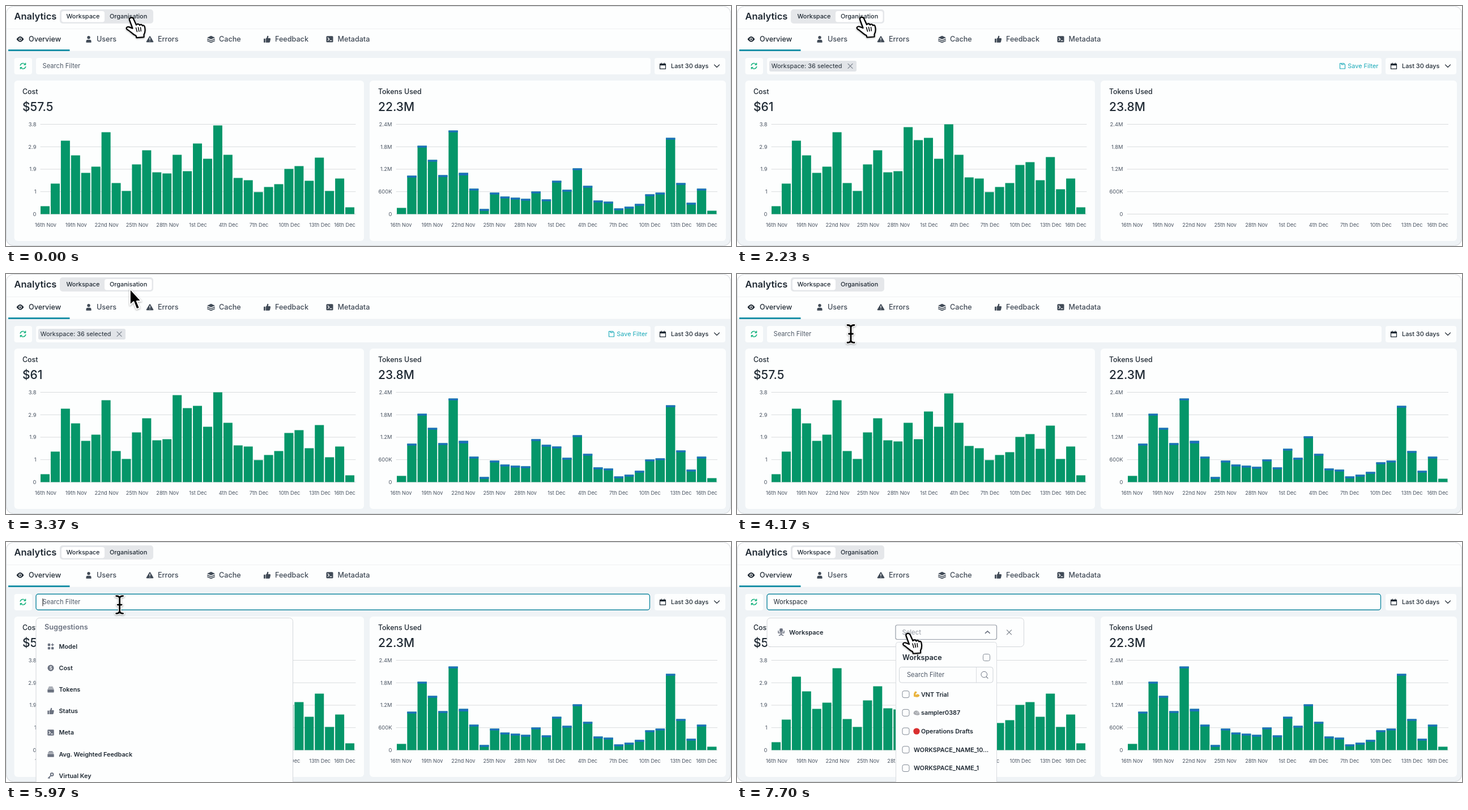
An HTML page for the animation above (7730 ms loop, 1280 by 425 pixels).

```html
<!DOCTYPE html>
<html lang="en">
<head>
<meta charset="utf-8">
<title>Analytics</title>
<style>
  html, body { margin: 0; width: 100%; height: 100%; overflow: hidden; background: #fff; }
  svg { display: block; width: 100vw; height: 100vh; font-family: Inter, "Open Sans", sans-serif; }
  #cursor { filter: drop-shadow(0 1px 1.5px rgba(0, 0, 0, .35)); }
</style>
</head>
<body>
<svg id="stage" viewBox="0 0 1280 425" xmlns="http://www.w3.org/2000/svg"></svg>
<script>
const LOOP = 7730;
const INK = '#1f2933', ICON = '#414b57', GREY = '#6b7280', TEAL = '#1488a0';
const PANEL = '#fdfefe', GREEN = '#059669', BLUE = '#1d6fbd';
const BASE = 368.5, COUNT = 31;

// Key moments in ms
const T = {
  click: 960, costReady: 1740, tokensReady: 2150, costGrow: 1760, tokensGrow: 2240,
  leave: 3250, reset: 3650, focus: 4570, descend: 5870, pick: 6480, across: 6800, open: 7350
};

// Small markup helpers
const text = (x, y, s, size, weight = 400, fill = INK, anchor = 'start', id = '') =>
  `<text ${id && `id="${id}"`} x="${x}" y="${y}" font-size="${size}" font-weight="${weight}" fill="${fill}" text-anchor="${anchor}">${s}</text>`;
const box = (x, y, w, h, r, fill, stroke = 'none', extra = '') =>
  `<rect x="${x}" y="${y}" width="${w}" height="${h}" rx="${r}" fill="${fill}" stroke="${stroke}" ${extra}/>`;
const line = (d, stroke, width = 1, extra = '') =>
  `<path d="${d}" fill="none" stroke="${stroke}" stroke-width="${width}" stroke-linecap="round" stroke-linejoin="round" ${extra}/>`;
const shape = (d, fill) => `<path d="${d}" fill="${fill}"/>`;
const at = (x, y, body, k = 1) => `<g transform="translate(${x} ${y}) scale(${k})">${body}</g>`;
const group = (id, body) => `<g id="${id}">${body}</g>`;
const cross = (x, y, r = 4) => at(x, y, line(`M${-r} ${-r}L${r} ${r}M${r} ${-r}L${-r} ${r}`, '#7b828c', 1.2));

const icons = {
  eye: c => shape('M-6.5 0Q0 -9.5 6.5 0Q0 9.5 -6.5 0Z', c) + `<circle r="2.7" fill="#fff"/><circle r="1.5" fill="${c}"/>`,
  user: c => `<circle cy="-3" r="2.7" fill="${c}"/>` + shape('M-4.5 6V3.5Q-4.5 1 -2 1H2Q4.5 1 4.5 3.5V6Z', c),
  warn: c => line('M0 -4.5L5.3 4.5H-5.3Z', c, 2, `style="fill:${c}"`) + line('M0 -2V1M0 3.4V3.5', '#fff', 1.3),
  stack: c => shape('M0 -6L7 -2.8L0 .4L-7 -2.8Z', c) + line('M-6.3 0L0 2.9L6.3 0M-6.3 2.9L0 5.8L6.3 2.9', c, 1.5),
  thumb: c => box(-6, -1, 2.8, 7, .6, c) +
    shape('M-2.4 6V-.6L-.2 -3.2V-5.2Q1.8 -7 2.4 -4.6L1.7 -1.6H5Q6.3 -1.4 6 .2L5 4.8Q4.6 6 3.4 6Z', c),
  term: c => box(-6, -5.5, 12, 11, 1.5, c) + line('M-3.2 -2.4L-.8 0L-3.2 2.4M.6 2.6H3.4', '#fff', 1.3),
  grid: c => box(-5.5, -5.5, 4.6, 4.6, 1, c) + box(-5.5, 1, 4.6, 4.6, 1, c) + box(1, 1, 4.6, 4.6, 1, c) +
    line('M3.3 -5.3V-1.1M1.2 -3.2H5.4', c, 1.5),
  coin: c => `<circle r="5.8" fill="${c}"/>` + text(0, 3.1, '$', 8.5, 600, '#fff', 'middle'),
  drawer: c => box(-6, -.5, 12, 6, 1, c) + line('M-4.7 -2.3H4.7M-3.2 -4.6H3.2', c, 1.4),
  key: c => `<circle cx="2.2" cy="-2.2" r="2.5" fill="none" stroke="${c}" stroke-width="2"/>` + line('M.2 -.2L-4.5 4.5M-3.2 3.2L-2 4.5', c, 1.8),
  chair: c => box(-2.8, -6.5, 5.6, 6.4, 1.5, c) + line('M-5 -2V1.6H5V-2M0 2V5M-3.5 6L0 4.2L3.5 6', c, 1.5)
};
const icon = (name, x, y, c = ICON, k = 1) => at(x, y, icons[name](c), k);

// Bar tops in stage pixels; `org` holds only what differs
const charts = [
  {
    key: 'cost', left: 61, right: 617, pitch: 17.935, bar: 16, labelX: 70, labelStep: 53.8, lastX: 598,
    ticks: ['3.8', '2.9', '1.9', '1', '0'], title: 'Cost', totals: ['$57.5', '$61'],
    tops: [355, 315, 239, 265, 296, 285, 224, 314, 328, 281, 256, 295, 297, 264, 293, 244, 271, 212, 264, 305, 309,
      330, 321, 316, 289, 284, 310, 269, 328, 306, 357],
    org: { 12: 293, 13: 215, 14: 238, 15: 234, 17: 210, 19: 304, 20: 306, 23: 314, 24: 282, 25: 277, 26: 309, 27: 268, 28: 325 }
  },
  {
    key: 'tokens', left: 689, right: 1255.5, pitch: 18.27, bar: 16.4, labelX: 697.5, labelStep: 54.9, lastX: 1237,
    ticks: ['2.4M', '1.8M', '1.2M', '600K', '0'], title: 'Tokens Used', totals: ['22.3M', '23.8M'],
    tops: [358, 301, 248, 273, 300, 221, 296, 324, 360, 331, 338, 340, 342, 329, 343, 310, 326, 288, 319, 345, 347,
      359, 356, 351, 334, 331, 234, 314, 349, 324, 363],
    org: { 12: 341, 13: 293, 14: 303, 15: 306, 17: 286, 19: 343, 20: 345, 23: 349, 24: 329, 25: 327, 26: 233, 27: 313, 28: 347, 30: 362 }
  }
];
const days = ['16th Nov', '19th Nov', '22nd Nov', '25th Nov', '28th Nov', '1st Dec', '4th Dec', '7th Dec', '10th Dec', '13th Dec', '16th Dec'];
const capHeight = i => i === 0 || i === 30 ? 0 : i === 6 ? 4.5 : 3.2;

function chartMarkup(c) {
  let s = '';
  c.ticks.forEach((label, i) => {
    const y = 209.5 + i * 39.75;
    s += line(`M${c.left} ${y}H${c.right}`, '#d9dbdd', 1.2) + text(c.left - 7.5, y + 3.4, label, 9.4, 400, '#4b5563', 'end');
  });
  days.forEach((d, i) => {
    s += text(i === 10 ? c.lastX : c.labelX + i * c.labelStep, 391.3, d, 9.2, 400, '#4b5563', 'middle');
  });
  for (let i = 0; i < COUNT; i++) {
    const x = c.left + (c.key === 'tokens' ? 1 : 0) + i * c.pitch;
    s += `<rect class="${c.key}Bar" x="${x}" width="${c.bar}" fill="${GREEN}"/>`;
    if (c.key === 'tokens') s += `<rect class="tokensCap" x="${x}" width="${c.bar}" fill="${BLUE}"/>`;
  }
  return group(c.key + 'Chart', text(c.left - 32, 186.3, '', 21, 500, INK, 'start', c.key + 'Total') + s);
}

function spinner(id, x) {
  const p = a => `${17.5 * Math.cos(a * Math.PI / 180)} ${17.5 * Math.sin(a * Math.PI / 180)}`;
  return at(x, 286, group(id, line(`M${p(172)}A17.5 17.5 0 1 1 ${p(80)}`, '#1f8fae', 2)));
}

const tabs = [
  ['eye', 25, 40, 'Overview'], ['user', 146, 160, 'Users'], ['warn', 254, 268, 'Errors'],
  ['stack', 362, 376, 'Cache'], ['thumb', 461, 475, 'Feedback'], ['term', 571.5, 585.5, 'Metadata']
];
const suggestions = [
  ['grid', 'Model'], ['coin', 'Cost'], ['drawer', 'Tokens'], ['thumb', 'Status'],
  ['term', 'Meta'], ['drawer', 'Avg. Weighted Feedback'], ['key', 'Virtual Key']
];

const header =
  box(0, 0, 1280, 425, 13, '#eff3f6') +
  shape('M0 79.5V13Q0 0 13 0H1267Q1280 0 1280 13V79.5Z', '#fdfefe') +
  line('M1 40.5H1279', '#f0f1f3') +
  text(14.5, 24.3, 'Analytics', 16.5, 600) +
  box(95, 6, 165, 25, 5, '#e5e7ea') + box(98, 9, 76, 19.5, 4, '#fff', 'none', 'id="pill"') +
  text(106.5, 22.3, 'Workspace', 10.9, 500) + text(183, 22.3, 'Organisation', 10.9, 500) +
  tabs.map(([n, ix, tx, s], i) => icon(n, ix, 58.7, i ? ICON : INK) + text(tx, 63.2, s, 12.6, 500, i ? '#404a56' : INK)).join('') +
  box(4, 77, 108.5, 2.8, 0, '#0f8ba3');

const toolbar =
  box(14.5, 92, 31.5, 29, 4, PANEL) + box(53, 92, 1085, 29, 4, PANEL) + box(1145, 92, 125, 29, 4, PANEL) +
  at(30, 106.3, line('M-4.8 -1.2A5 5 0 0 1 4.2 -2.6M4.8 1.2A5 5 0 0 1 -4.2 2.6M4.6 -5V-2.3H1.8M-4.6 5V2.3H-1.8', '#16b27e', 1.4)) +
  at(1159.5, 106.3, line('M-5 -3.6H5V5H-5ZM-2.6 -5.4V-3.6M2.6 -5.4V-3.6', INK, 1.2) + box(-5, -4, 10, 3, .5, INK)) +
  text(1174, 110.1, 'Last 30 days', 10.9, 500) + line('M1250.5 104L1255 108.5L1259.500 104', INK, 1.1) +
  box(53, 92.3, 1083.500, 28, 4, 'none', TEAL, 'id="ring" stroke-width="1.4"') +
  text(64.5, 110.3, '', 11.2, 400, '#4f5967', 'start', 'query') +
  `<path id="caret" d="M65 100V113.5" stroke="#111" stroke-width="1"/>` +
  group('tag', box(57, 97, 154, 19, 3, '#e1e4e8') + text(60.8, 110, 'Workspace: 36 selected', 10.9) + cross(200, 106.3) +
    at(1069, 106, line('M-4.500 -4.5H2.2L4.5 -2.2V5H-4.5ZM-1.8 -4.3V-2.4H2', '#18a9b8', 1.1)) +
    text(1078.3, 109.900, 'Save Filter', 10.9, 400, '#18a9b8'));

const cards =
  box(14.500, 132, 617.5, 284, 6, PANEL) + box(642, 132, 629, 284, 6, PANEL) +
  charts.map(c => text(c.left - 32, 156.2, c.title, 12.4, 500) + chartMarkup(c)).join('') +
  spinner('costSpin', 323) + spinner('tokensSpin', 956);

const listPopup = group('list',
  box(53, 134.5, 453.5, 310, 6, PANEL, '#d3d6da') + text(68, 155.2, 'Suggestions', 12.7, 600, GREY) +
  suggestions.map(([n, s], i) => {
    const y = 185 + i * 38.13;
    return icon(n, 79, y, GREY, .95) + text(93.5, y + 3.9, s, 10.8, 600);
  }).join(''));

const pickedPopup = group('picked',
  box(53, 134.5, 453.5, 51, 6, PANEL, '#d3d6da') + icon('chair', 78, 159.5, GREY) +
  text(92, 163.6, 'Workspace', 11, 600) +
  box(280, 147, 178.5, 25.500, 3, PANEL, '#959ca6', 'stroke-width="1.2"') + text(291.5, 163.6, 'Select', 11.2, 500, '#a0a5ad') +
  `<path id="chevron" d="M438 -2L442.3 2L446.600 -2" fill="none" stroke="${GREY}" stroke-width="1.6"/>` + cross(480.5, 159.8));

const check = (x, y) => box(x - 6, y - 6, 12, 12, 3, PANEL, '#838b96');
const options = [
  [at(317, 0, shape('M-5 4V-1L-3 -5H0L.5 -2.500L-1.5 -1.500V1Q3 -2.500 5.500 2Q4 5.5 0 5Z', '#e9b440')), 'VNT Trial', 325],
  [at(317, 0, shape('M-5.5 1Q-5 -4 0 -4Q4.500 -3.500 5.5 3Q3 5 0 4Q-4 4 -5.5 1Z', '#a8abb0') + line('M-2 -1L1 2M1 -2L3 1', '#e4e5e7', 1)), 'sampler0387', 325],
  ['<circle cx="317" r="5.700" fill="#d92f2f"/>', 'Operations Drafts', 325],
  ['', 'WORKSPACE_NAME_10...', 312], ['', 'WORKSPACE_NAME_1', 312]
];
const menu = group('menu',
  box(280.5, 177.500, 178, 270, 4, PANEL, '#d9dce0') +
  text(292, 208.6, 'Workspace', 12.7, 600) + check(440.5, 204.5) +
  box(286.500, 221.5, 165.5, 27.5, 4, PANEL, '#cfd3d8') + line('M422.5 222V249', '#d9dce0') +
  text(300, 239.3, 'Search Filter', 11.1, 400, '#4f5967') +
  `<circle cx="436.300" cy="234.6" r="5.3" fill="none" stroke="${GREY}"/>` + line('M440.2 238.6L443 241.4', GREY, 1.1) +
  options.map(([mark, s, x], i) => {
    const y = 269.700 + i * 32.7;
    return check(298, y) + at(0, y, mark) + text(x, y + 3.8, s, 10.8, 600);
  }).join(''));

const hand = 'M-3 3C-4 -1 2 -3 4 1L9 12C11 9.5 14 10 15 12.5C16.5 10.5 19 11 20 13.5C21.5 12 23.5 13 24 16C25 21 25 25 22.5 29V33.5L9.500 34.500L8.5 31C3 29 0 24 -7 20C-10 17.5 -7 14.5 -4 15.5L2.500 18Z';
const beam = 'M-6 -15.500Q0 -15.500 0 -11Q0 -15.500 6 -15.5M0 -11V11M-6 15.5Q0 15.5 0 11Q0 15.5 6 15.5M-3.500 0H3.5';
const cursors =
  group('hand', line(hand, '#000', 2.2, 'style="fill:#fff"') + line('M8.500 17L10.5 24M12.500 16.500L14 23.5M16.500 16.500L17.3 23', '#000', 1.5)) +
  group('arrow', line('M0 0V29L6.5 23L11.5 36L17 34L12 22H20Z', '#fff', 2, 'style="fill:#000"')) +
  group('beam', line(beam, '#fff', 5.5) + line(beam, '#000', 2.8));

const stage = document.getElementById('stage');
stage.innerHTML = header + toolbar + cards +
  box(.5, .5, 1279, 424, 13, 'none', '#d2d5d9') +
  listPopup + pickedPopup + menu + group('cursor', cursors);

const $ = id => document.getElementById(id);
const show = (id, on) => $(id).setAttribute('display', on ? 'inline' : 'none');
for (const c of charts) {
  c.bars = [...stage.querySelectorAll(`.${c.key}Bar`)];
  c.caps = [...stage.querySelectorAll(`.${c.key}Cap`)];
}

const clamp = v => Math.max(0, Math.min(1, v));
const ease = p => p < .5 ? 2 * p * p : 1 - 2 * (1 - p) * (1 - p);
const easeOut = p => 1 - (1 - p) ** 3;
const span = (t, start, length) => clamp((t - start) / length);

// Pointer legs: start, length, from, to
const legs = [
  [0, 230, 221, 21.6, 220, 21], [T.leave, 700, 220, 21, 201, 106],
  [T.descend, 530, 201, 106, 195.500, 175.5], [T.across, 450, 195.5, 175.5, 301.500, 163]
];
function drawCursor(t) {
  const [start, length, x0, y0, x1, y1] = legs.filter(l => t >= l[0]).pop();
  const p = ease(span(t, start, length));
  const x = x0 + (x1 - x0) * p, y = y0 + (y1 - y0) * p;
  $('cursor').setAttribute('transform', `translate(${x} ${y})`);
  const kind = t < T.leave + 80 || y > 124 ? 'hand' : y > 92 ? 'beam' : 'arrow';
  for (const k of ['hand', 'arrow', 'beam']) show(k, k === kind);
}

function drawChart(c, t, org) {
  const loading = t >= T.click && t < T[c.key + 'Ready'];
  show(c.key + 'Chart', !loading);
  show(c.key + 'Spin', loading);
  $(c.key + 'Spin').setAttribute('transform', `rotate(${(t - 1430) * .45})`);
  $(c.key + 'Total').textContent = c.totals[org ? 1 : 0];
  const grow = org ? easeOut(span(t, T[c.key + 'Grow'], 450)) : 1;
  c.bars.forEach((bar, i) => {
    const top = org && c.org[i] || c.tops[i];
    const h = (BASE - top + .5) * grow;
    bar.setAttribute('y', BASE - h);
    bar.setAttribute('height', h);
    const cap = c.caps[i];
    if (cap) {
      cap.setAttribute('y', BASE - h);
      cap.setAttribute('height', capHeight(i) * grow);
    }
  });
}

function draw(t) {
  const org = t >= T.click && t < T.reset;
  const focused = t >= T.focus, picked = t >= T.pick, open = t >= T.open;
  $('pill').setAttribute('x', org ? 174 : 98);
  $('pill').setAttribute('width', org ? 83.5 : 76);
  show('tag', org);
  show('ring', focused);
  show('query', !org);
  $('query').textContent = picked ? 'Workspace' : 'Search Filter';
  $('query').setAttribute('fill', picked ? INK : '#4f5967');
  show('caret', focused && !picked && (t - T.focus) % 1060 < 530);
  show('list', focused && !picked);
  show('picked', picked);
  show('menu', open);
  $('chevron').setAttribute('transform', `translate(0 159.8) scale(1 ${open ? -1 : 1})`);
  charts.forEach(c => drawChart(c, t, org));
  drawCursor(t);
}

const begin = performance.now();
function tick() {
  draw((performance.now() - begin) % LOOP);
  requestAnimationFrame(tick);
}
tick();
</script>
</body>
</html>
```
